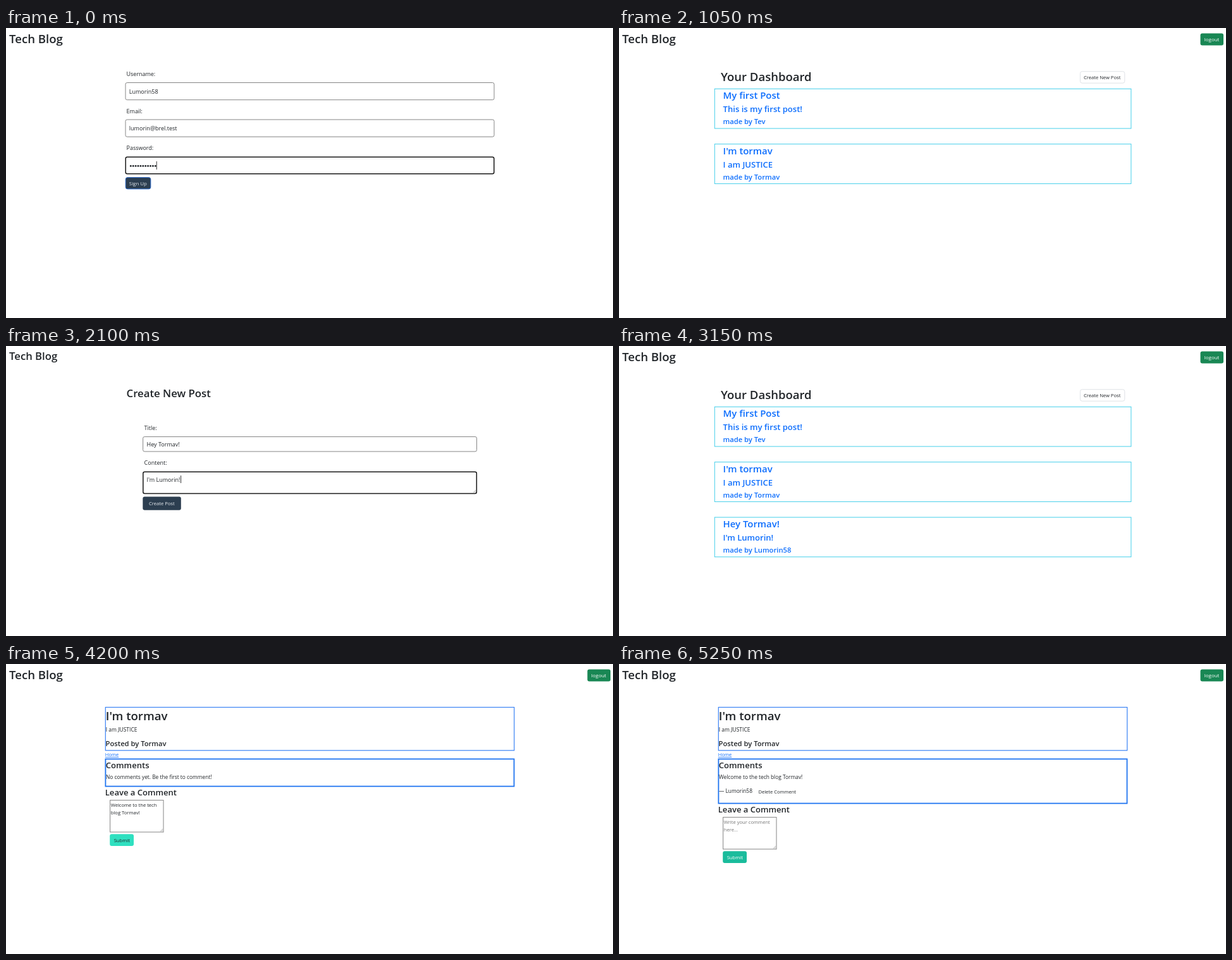
Write an HTML page that moves like this. It is 960 by 459 pixels and loops after 6300 ms.

```html
<!DOCTYPE html>
<html lang="en">
<head>
<meta charset="utf-8">
<title>Tech Blog</title>
<style>
  html, body { margin: 0; width: 100%; height: 100%; overflow: hidden; background: #fff; }
  svg { display: block; width: 960px; height: 459px; }
  text { font-family: "Open Sans", "Noto Sans", sans-serif; white-space: pre; }
</style>
</head>
<body>
<svg id="stage" viewBox="0 0 960 459" xmlns="http://www.w3.org/2000/svg"></svg>
<script>
const SCENE_MS = 1050;
const INK = '#212529', BLUE = '#0d6efd', NAVY = '#2c3e50';
const HERO = 'Tormav', USER = 'Lumorin', HANDLE = USER + '58';

const text = (x, y, size, str, fill = INK, weight = 400, extra = '') =>
  `<text x="${x}" y="${y}" font-size="${size}" fill="${fill}" font-weight="${weight}" ${extra}>${str}</text>`;

const heading = (x, y, size, str, fill = INK) => text(x, y, size, str, fill, 600);

const box = (left, top, right, bottom, { fill = 'none', stroke = 'none', width = 1, r = 0 } = {}) =>
  `<rect x="${left}" y="${top}" width="${right - left}" height="${bottom - top}" rx="${r}"
    fill="${fill}" stroke="${stroke}" stroke-width="${width}"/>`;

const line = (d, stroke, width = 1) =>
  `<path d="${d}" fill="none" stroke="${stroke}" stroke-width="${width}"/>`;

const field = (left, top, right, bottom) =>
  box(left, top, right, bottom, { fill: '#fff', stroke: '#858585', r: 2.5 });

const focusedField = (left, top, right, bottom) =>
  box(left, top, right, bottom, { fill: '#fff', stroke: '#181818', width: 1.5, r: 2.5 });

const caret = (x, top, bottom) => line(`M${x} ${top}V${bottom}`, '#222', 0.9);

const grip = (x, y) => line(`M${x - 4} ${y}l4-4M${x - 2} ${y}l2-2`, '#8a8a8a', 0.6);

const logout = () =>
  box(919.5, 8.5, 956, 27.5, { fill: '#198754', r: 3 }) + text(925.8, 21, 7.9, 'logout', '#fff');

const brand = (y = 23.7, size = 18.6) => heading(5, y, size, 'Tech Blog');

function signUp() {
  const dots = Array.from({ length: 11 }, (_, i) =>
    `<circle cx="${197.3 + 3.9 * i}" cy="218.4" r="1.45" fill="${INK}"/>`).join('');
  return brand()
    + text(190.6, 76, 8.95, 'Username:')
    + field(189, 86.5, 772, 113.7) + text(194.8, 104, 9, HANDLE)
    + text(190.6, 134.8, 8.95, 'Email:')
    + field(189, 145, 772, 172.2) + text(194.8, 162.4, 9, 'lumorin@brel.test')
    + text(190.6, 193.3, 8.95, 'Password:')
    + focusedField(189.2, 204.3, 771.8, 230.8) + dots + caret(238.2, 211, 224)
    + box(189.2, 236.6, 228.8, 254.8, { fill: NAVY, stroke: '#2463c4', r: 3 })
    + text(194.8, 248.8, 7.9, 'Sign Up', '#e4e9ee');
}

function dashboard(posts) {
  const cards = posts.map(([title, body, author], i) =>
    `<g transform="translate(0 ${87.4 * i})">`
    + box(151.3, 96.3, 809.9, 159, { stroke: '#45cfea' })
    + heading(164.6, 112.3, 14.9, title, BLUE)
    + heading(164.6, 133.2, 13.05, body, BLUE)
    + heading(164.6, 152.2, 11.2, 'made by ' + author, BLUE)
    + '</g>').join('');
  return brand() + logout()
    + heading(161, 83.8, 18.5, 'Your Dashboard')
    + box(729.4, 68.8, 799.8, 87.2, { fill: '#fff', stroke: '#dee2e6', r: 3 })
    + text(735, 80.8, 7.6, 'Create New Post')
    + cards;
}

function newPost() {
  return brand(22.2, 16.7)
    + heading(190.6, 80.6, 16.75, 'Create New Post')
    + text(218.6, 132.8, 9, 'Title:')
    + field(216.6, 143.6, 744.5, 167) + text(222.6, 159.2, 9, `Hey ${HERO}!`)
    + text(218.6, 188.4, 9, 'Content:')
    + focusedField(216.8, 199.3, 744.3, 233.4) + text(222.6, 214.9, 9, `I'm ${USER}!`)
    + caret(276.6, 205, 217) + grip(743, 232)
    + box(216.3, 238.6, 276.8, 259.7, { fill: NAVY, r: 3 })
    + text(226, 252.3, 7.6, 'Create Post', '#e9edf1');
}

function postPage({ comment, shift, lines, ink, submitFill, submitInk }) {
  return brand() + logout()
    + box(157.3, 68.5, 803.7, 136.8, { stroke: '#3a82f4', width: 1.2 })
    + heading(157.8, 88.8, 18.65, `I'm ${HERO.toLowerCase()}`)
    + text(157.8, 106.8, 8.5, 'I am JUSTICE')
    + heading(157.6, 130, 11.2, 'Posted by ' + HERO)
    + text(156.8, 146.3, 7.6, 'Home', BLUE, 400, 'text-decoration="underline"')
    + box(157.4, 150.4, 803.5, 193.6 + shift, { stroke: '#1f74f0', width: 1.8 })
    + heading(157.8, 164.8, 13.1, 'Comments')
    + comment
    + `<g transform="translate(0 ${shift})">`
    + heading(156.8, 208.2, 13.05, 'Leave a Comment')
    + box(164.6, 215.6, 249, 266, { fill: '#fff', stroke: '#858585' })
    + lines.map((str, i) => text(165.8, 225.9 + 12 * i, 7.6, str, ink)).join('')
    + grip(248, 265)
    + box(164.2, 269.2, 202, 288, { fill: submitFill, r: 3 })
    + text(170.7, 281.6, 7.6, 'Submit', submitInk)
    + '</g>';
}

const posts = [
  ['My first Post', 'This is my first post!', 'Tev'],
  [`I'm ${HERO.toLowerCase()}`, 'I am JUSTICE', HERO],
  [`Hey ${HERO}!`, `I'm ${USER}!`, HANDLE],
];

const scenes = [
  signUp(),
  dashboard(posts.slice(0, 2)),
  newPost(),
  dashboard(posts),
  postPage({
    comment: text(157.9, 181.8, 8.37, 'No comments yet. Be the first to comment!'),
    shift: 0,
    lines: ['Welcome to the tech', `blog ${HERO}!`],
    ink: INK, submitFill: '#2fe0c0', submitInk: INK,
  }),
  postPage({
    comment: text(157.9, 181.8, 8.37, `Welcome to the tech blog ${HERO}!`)
      + text(157.9, 204.3, 8.37, '— ' + HANDLE)
      + text(220.4, 205.2, 7.55, 'Delete Comment'),
    shift: 27,
    lines: ['Write your comment', 'here...'],
    ink: '#757575', submitFill: '#1abc9c', submitInk: '#fff',
  }),
];

const stage = document.getElementById('stage');
stage.innerHTML = scenes.map(scene => `<g opacity="0">${scene}</g>`).join('');

// Each scene holds for one slot, then cuts to the next.
[...stage.children].forEach((group, index) => {
  const steps = Array.from({ length: scenes.length + 1 }, (_, slot) => ({
    offset: slot / scenes.length,
    opacity: slot === index ? 1 : 0,
    easing: 'steps(1, end)',
  }));
  group.animate(steps, { duration: SCENE_MS * scenes.length, iterations: Infinity });
});
</script>
</body>
</html>
```
